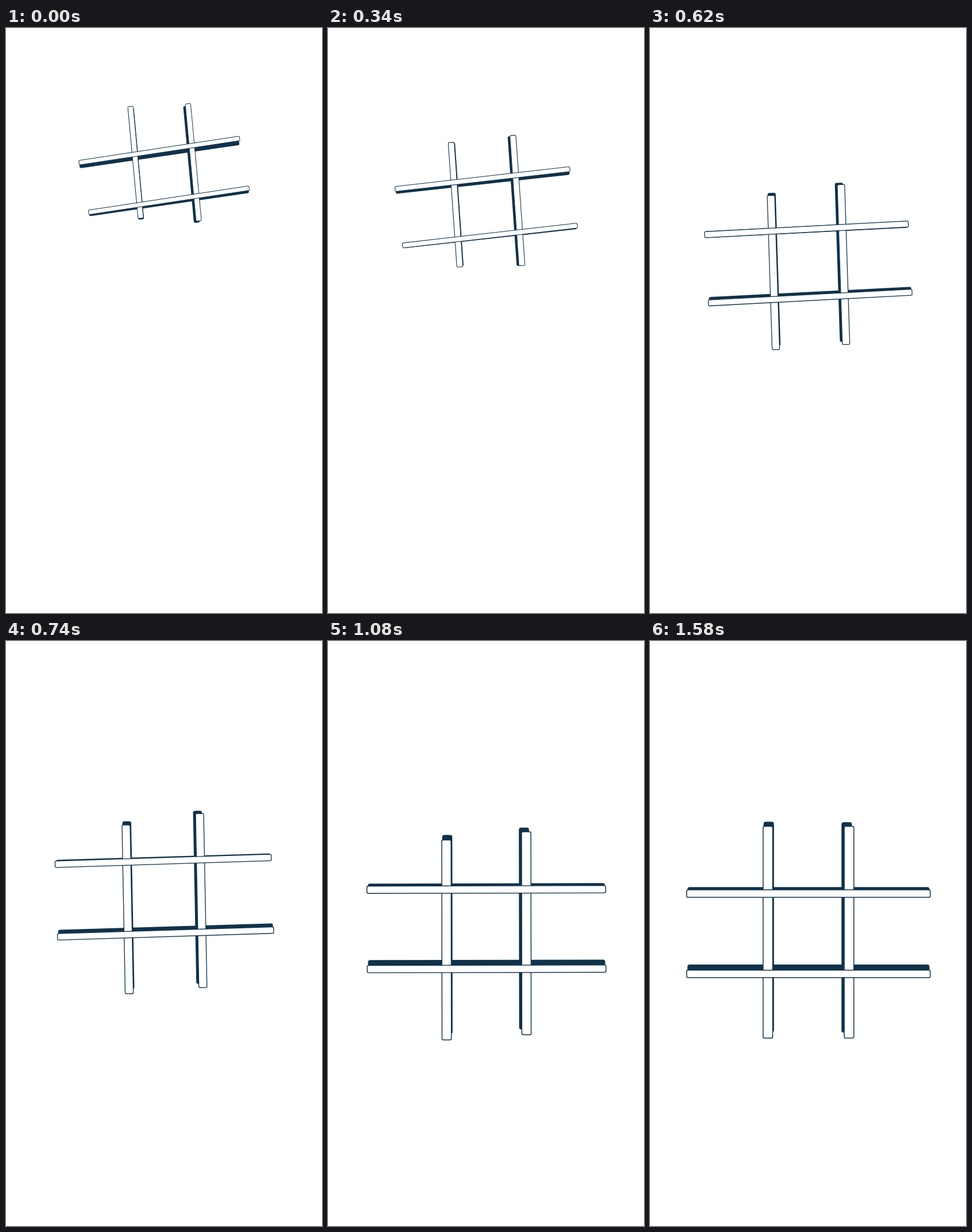
Recreate the animation shown at these times as an HTML page with a canvas. Size 550 by 1018 pixels, loop 1.6 s.

```html
<!DOCTYPE html>
<html lang="en">
<head>
<meta charset="utf-8">
<title>Grid</title>
<style>
html, body { margin: 0; height: 100%; overflow: hidden; background: #fff; }
canvas { display: block; }
</style>
</head>
<body>
<canvas id="stage" width="550" height="1018"></canvas>
<script>
const ctx = document.getElementById('stage').getContext('2d');
const LOOP = 1600, STEP = 20, INK = '#10324a';
const MID = 275.8, EYE_X = 243, DEPTH = 0.036;

// Slow start, long settling; returns what is left of the way, 1 to 0.
function left(t, duration, settle) {
  const phase = 1 - Math.max(0, 1 - t / duration) ** settle;
  return 1 - Math.sin(phase * Math.PI / 2) ** 2.4;
}

const mix = (from, to, rest) => to + (from - to) * rest;

// A bar is its centre, length, width and angle.
function layout(t) {
  const turn = left(t, 1340, 1.6), move = left(t, 1440, 1.64), far = left(t, 1600, 1.9);
  const swing = Math.sin(Math.PI * Math.min(1, t / 1580)) ** 1.6;
  const scale = 1 / (1 + 0.5 * far);

  const across = (shift, from, to) => ({
    x: MID + shift * move,
    y: mix(from, to, move),
    length: 425.5 * scale,
    width: 14.6 * scale ** 1.25,
    angle: -8.6 * turn * Math.PI / 180
  });
  const upright = (side, zoom, sway, lift) => ({
    x: MID + side * 70.6 / (1 + 0.405 * far),
    y: mix(233.7, 506.8, move) + 29 * sway * swing,
    length: 370 / (1 + zoom * far + 0.03 * sway * swing),
    width: 18.2 * scale ** 1.4,
    angle: (90 - 5.27 * turn) * Math.PI / 180,
    lift
  });

  return {
    scale,
    rows: [across(-8.9, 213.2, 439.5), across(7.7, 299.7, 579.2)],
    columns: [upright(-1, 0.885, 1, 2.9), upright(1, 0.798, 0.47, 2)]
  };
}

function drawBar(b, radius, line) {
  const length = b.length - line, width = b.width - line;
  ctx.save();
  ctx.translate(b.x, b.y);
  ctx.rotate(b.angle);
  ctx.beginPath();
  ctx.roundRect(-length / 2, -width / 2, length, width, radius);
  ctx.fillStyle = line ? '#fff' : INK;
  ctx.fill();
  if (line) {
    ctx.lineWidth = line;
    ctx.strokeStyle = INK;
    ctx.stroke();
  }
  ctx.restore();
}

function draw(t) {
  const { scale, rows, columns } = layout(t);
  const eyeY = 330 + 180 * (1 - scale);

  // Rear faces lie nearer to the vanishing point.
  const rearRow = b => ({
    ...b,
    y: b.y - DEPTH * (b.y - eyeY),
    length: b.length * 0.99,
    angle: b.angle * (1 - DEPTH)
  });
  const rearColumn = b => ({
    ...b,
    x: b.x - 0.039 * (b.x - EYE_X),
    y: b.y - DEPTH * (b.y - eyeY) - b.lift,
    length: b.length * 0.99
  });

  ctx.clearRect(0, 0, 550, 1018);
  for (const b of [...rows.map(rearRow), ...columns.map(rearColumn)]) drawBar(b, 4 * scale, 0);
  for (const b of [...columns, ...rows]) drawBar(b, 2.6 * scale, 1.5 * scale);
}

function tick() {
  draw(Math.floor(performance.now() % LOOP / STEP) * STEP);
  requestAnimationFrame(tick);
}
tick();
</script>
</body>
</html>
```
